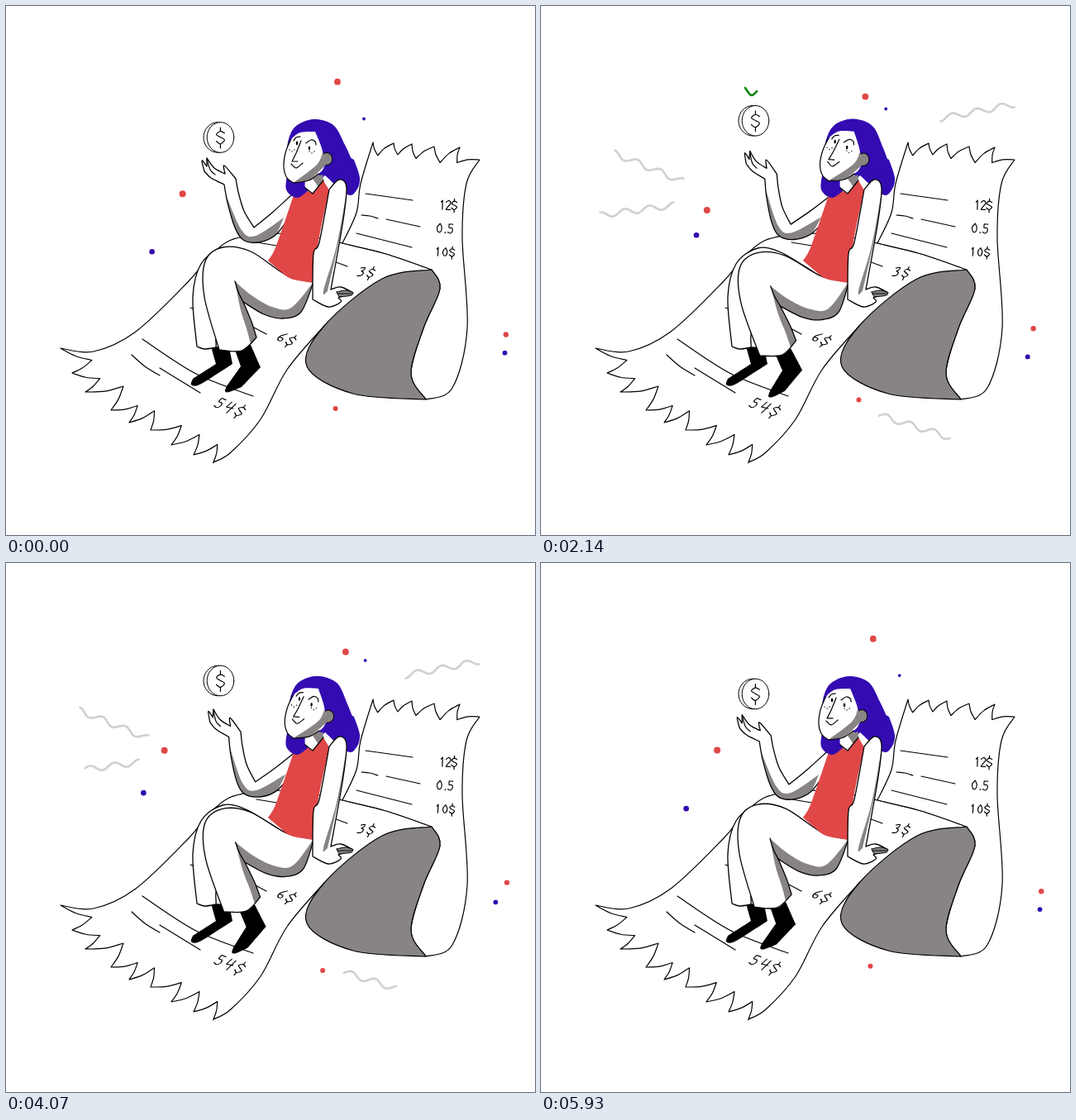
An HTML page with a canvas for the animation above (6000 ms loop, 640x640 px).

```html
<!DOCTYPE html>
<html lang="en">
<head>
<meta charset="utf-8">
<title>Receipt</title>
<style>
html, body { margin: 0; width: 100%; height: 100%; overflow: hidden; background: #fff; }
canvas { display: block; width: 640px; height: 640px; }
</style>
</head>
<body>
<canvas id="stage"></canvas>
<script>
const LOOP = 6000, PEAK = 2860, TRAIL = 700;
const BLACK = '#000', WHITE = '#fff', GREY = '#898484', RED = '#e04747',
      BLUE = '#330bb1', PALE = '#d0d0d0', GREEN = '#078207';
const canvas = document.getElementById('stage');
const ctx = canvas.getContext('2d');
const ratio = window.devicePixelRatio || 1;
canvas.width = canvas.height = 640 * ratio;

// Smooth curve through "x,y x,y"; a slash makes the point before it a corner.
function spline(text) {
  let d = '', last = null;
  for (const piece of text.split('/')) {
    const pts = piece.trim().split(/\s+/).map(s => s.split(',').map(Number));
    if (last) pts.unshift(last); else d = 'M' + pts[0];
    for (let i = 0; i < pts.length - 1; i++) {
      const b = pts[i], c = pts[i + 1], a = pts[i - 1] || b, e = pts[i + 2] || c;
      d += `C${b[0] + (c[0] - a[0]) / 6},${b[1] + (c[1] - a[1]) / 6} ` +
           `${c[0] - (e[0] - b[0]) / 6},${c[1] - (e[1] - b[1]) / 6} ${c}`;
    }
    last = pts[pts.length - 1];
  }
  return d;
}

const cache = new Map();
function curve(text) {
  if (!cache.has(text)) cache.set(text, new Path2D(spline(text)));
  return cache.get(text);
}

function fill(color, text) {
  ctx.fillStyle = color;
  ctx.fill(curve(text));
}

function line(text, width = 1.2) {
  ctx.strokeStyle = BLACK;
  ctx.lineWidth = width;
  ctx.stroke(curve(text));
}

function shape(color, text, width) {
  fill(color, text);
  line(text, width);
}

function oval(color, x, y, rx, ry = rx) {
  ctx.fillStyle = color;
  ctx.beginPath();
  ctx.ellipse(x, y, rx, ry, 0, 0, Math.PI * 2);
  ctx.fill();
}

function turn(x, y, angle, part) {
  ctx.save();
  ctx.translate(x, y);
  ctx.rotate(angle);
  ctx.translate(-x, -y);
  part();
  ctx.restore();
}

// Torn edge: between two tips the paper dips to one side of the line.
function torn(tips, along, depth) {
  const pts = tips.split(' ').map(s => s.split(',').map(Number));
  let text = '' + pts[0];
  for (let i = 1; i < pts.length; i++) {
    const [x, y] = pts[i - 1], [p, q] = pts[i], dx = p - x, dy = q - y;
    const at = (u, v) => [x + u * dx - v * dy, y + u * dy + v * dx];
    text += ` ${at(along / 2 - 0.05, depth / 2)} ${at(along, depth)}` +
            ` / ${at((1 + along) / 2 - 0.05, depth / 2 - 0.05)} ${pts[i]} /`;
  }
  return text;
}

// Wavy line with three crests between two points.
function wave(x, y, p, q, phase) {
  const dx = p - x, dy = q - y, size = 3.6 / Math.hypot(dx, dy) * Math.sign(dx);
  return Array.from({ length: 37 }, (_, i) => {
    const u = i / 36, v = size * Math.cos(Math.PI * 6 * u + phase);
    return [x + u * dx - v * dy, y + u * dy + v * dx].join();
  }).join(' ');
}

const GLYPHS = {
  '0': ['3,0 0,4 1,9 4,9 5,4 3,0'],
  '1': ['0.5,2 / 2,0 / 2,10'],
  '2': ['0,2 3,0 5,3 2,7 0,10 / 5,10'],
  '3': ['0,1 4,0 4,3 2,4 / 5,6 4,9 0,10'],
  '4': ['1,0 / 0,6 / 6,5', '5,0 / 4,11'],
  '5': ['5,0 / 1,0 / 1,4 4,4 5,7 3,10 0,9'],
  '6': ['4,0 0,5 1,9 4,9 4,6 0,6'],
  '.': ['1,9.2 / 1,10'],
  '$': ['6,2 3,0.6 0,3 3,5 6,7 3,10 0,8', '3,-2 / 3,0.6', '3,10 / 3,13']
};

function write(text, x, y, size, angle, slant, step) {
  ctx.save();
  ctx.translate(x, y);
  ctx.rotate(angle);
  ctx.transform(size, 0, -slant * size, size, 0, 0);
  for (const ch of text) {
    GLYPHS[ch].forEach(s => line(s, 1.2 / size));
    ctx.translate(ch === '.' ? 4 : step, 0);
  }
  ctx.restore();
}

const FOLD = '407,287 460,300 515,319';
const SHEET = '66,414 106,418 157,394 220,334 245,304 270,284 300,277 330,275 / 370,279 ' + FOLD +
  ' / 385,387 / 340,440 308,500 272,540 251,552 / ' +
  torn('251,552 227,543 200,531 175,513 149,504 127,489 96,467 80,444 66,414', 0.12, 0.85).slice(0, -1);
const BACK = torn('444,165 469,166 491,167 518,170 549,171 573,186', 0.25, 0.62) +
  ' 557,215 552,280 558,390 540,462 508,476 / 490,445 505,390 525,342 515,319 / 460,300 407,287 / 424,250 429,215 444,165';
const ROLL = '515,319 455,330 385,387 364,436 420,469 508,476 / 490,445 505,390 525,342 515,319';
const RULES = ['435,227 / 492,235', '430,253 440,254 450,257', '460,258 / 501,267', '424,275 / 491,292',
  '394,308 / 413,315', '300,389 / 315,397', '303,286 / 328,290', '223,365 / 226,366',
  '165,403 230,445 299,472', '152,422 168,436 186,447', '186,438 / 235,468'];

function drawPaper() {
  [SHEET, BACK].forEach(s => shape(WHITE, s));
  shape(GREY, ROLL);
  RULES.forEach(s => line(s));
  write('12$', 526, 235, 1.1, 0.03, 0, 6);
  write('0.5', 522, 263, 1.1, 0.06, 0, 8);
  write('10$', 521, 292, 1, 0.06, 0, 8);
  write('3$', 430, 316, 1.1, 0.12, 0.35, 10);
  write('6$', 336, 395, 1.2, 0.4, 0.4, 9);
  write('54$', 260, 474, 1.3, 0.38, 0.35, 10);
}

function drawCoin(y) {
  for (const [x, r] of [[256.5, 17.5], [259.5, 16.3]]) {
    oval(WHITE, x, y, r, 18.3);
    ctx.strokeStyle = BLACK;
    ctx.lineWidth = 1;
    ctx.stroke();
  }
  write('$', 254.5, y - 8.5, 1.65, 0, 0, 0);
}

const ARM = '345,229 322,250 300,268 / 288,248 281,225 278,209 / 264,193 265,203 / 252,196 243,184 / 243,194 ' +
  '/ 237,187 240,200 / 248,208 264,216 / 268,238 277,268 287,283 305,286 325,278 340,260';

function drawArm() {
  fill(WHITE, ARM);
  fill(GREY, '266,228 285,271 302,278 336,256 / 325,278 305,286 287,283 277,268 266,228');
  line('243,185 / 247,198 253,204');
  line(ARM, 1.3);
}

function drawFarLeg() {
  fill(BLACK, '248,412 / 270,413 / 274,433 / 248,450 / 232,459 224,458 226,451 / 254,433 / 248,412');
  shape(WHITE, '330,322 290,298 262,293 236,312 226,352 231,412 / 240,415 254,413 / 262,380 330,322', 1.3);
}

const LEG = '372,334 340,326 296,297 262,292 241,309 240,352 258,416 / 285,417 303,401 ' +
  '/ 297,382 287,358 / 312,373 335,378 357,370 372,334';

function drawNearLeg() {
  fill(BLACK, '277,416 / 296,410 / 308,437 / 285,461 / 270,467 265,466 267,460 / 284,436 / 277,416');
  fill(GREY, LEG);
  fill(WHITE, '372,334 340,326 296,297 262,292 241,309 240,352 258,416 / 285,417 296,409 ' +
    '/ 291,390 284,368 277,333 / 297,350 322,364 345,365 372,334');
  line(LEG, 1.3);
  line('277,333 281,346 287,358', 1.3);
}

function drawBody() {
  fill(RED, '348,229 / 362,222 / 371,227 / 384,211 / 391,223 / 378,285 372,335 / 345,330 331,320 317,308 / 327,290 348,229');
  fill(BLUE, '341,200 339,222 352,232 366,223 / 386,205 / 413,228 424,223 428,208 421,186 / 385,165 / 341,200');
  fill(WHITE, '363,205 / 362,219 371,227 / 384,211 / 380,198');
  fill(GREY, '371,209 / 383,198 / 384,211 / 378,219 / 371,209');
  line('362,220 371,227 / 384,211');
}

function drawHead() {
  fill(BLUE, '340,188 341,165 350,146 372,137 396,144 410,168 421,192 / 380,205');
  oval(GREY, 388, 185, 6.8, 7.6);
  ctx.strokeStyle = BLACK;
  ctx.lineWidth = 1;
  ctx.stroke();
  fill(WHITE, '346,160 338,178 336,195 340,208 348,214 / 378,203 386,192 / 382,172 374,152 / 356,153 346,160');
  fill(GREY, '383,177 376,192 349,213 / 366,211 387,192 / 383,177');
  line('344,162 338,178 336,195 340,208 348,214 / 366,211 378,203');
  line('357,163 351,178 346,188 / 353,188');
  line('345,191 351,196 359,190');
  line('348,163 351,159 356,158');
  line('363,166 369,162 374,164 375,168');
  for (const [x, y] of [[352, 166], [367, 172]]) {
    oval(BLACK, x, y, 1.2, 2.4);
    for (const k of [-1, 0, 1])
      oval(BLACK, x - 6 + 3 * k + (x > 360) * 9, y + 10 - 2 * k * k - (x > 360) * 4, 0.7);
  }
}

function drawSupport() {
  fill(WHITE, '391,222 403,210 412,220 407,265 393,343 / 405,340 420,347 / 402,353 / 405,358 390,364 371,355 / 372,300 379,286 391,222');
  fill(GREY, '412,225 407,265 389,345 / 384,345 400,290 412,225');
  line('391,222 403,210 412,220 407,265 393,343 / 405,340 420,347 / 402,353 / 405,358 390,364 371,355 / 372,300 379,286 391,222', 1.3);
  shape(GREY, '400,346 410,344 419,346 / 418,350 403,352 / 400,346', 1);
  line('401,348 / 418,348', 1);
}

// Strokes that draw themselves on and later run back.
const TRAILS = [
  [wave(483, 136, 572, 119, 0), 930, 4565],
  [wave(171, 212, 88, 178, Math.PI), 930, 4565],
  [wave(161, 241, 72, 253, Math.PI), 210, 3880],
  [wave(409, 495, 495, 522, 1.35), 210, 3880],
  ['247,99 255,108 265,99 275,92', 1770, 3200, GREEN]
].map(([text, on, off, color = PALE]) => {
  const el = document.createElementNS('http://www.w3.org/2000/svg', 'path');
  el.setAttribute('d', spline(text));
  return { text, on, off, color, len: el.getTotalLength() };
});

const rise = (t, start) => Math.min(1, Math.max(0, (t - start) / TRAIL));

function drawTrails(t) {
  for (const { text, on, off, color, len } of TRAILS) {
    const part = rise(t, on) - rise(t, off);
    if (part <= 0) continue;
    ctx.strokeStyle = color;
    ctx.lineWidth = 2.6;
    ctx.setLineDash([len * part, 999]);
    ctx.stroke(curve(text));
  }
  ctx.setLineDash([]);
}

// Each dot circles its centre once per loop: x, y, orbit, start in degrees, direction.
const DOTS = [
  { orbit: [401, 102.7, 11, -90, -1], r: 3.9, color: RED },
  { orbit: [428, 126.7, 11, 63, 1], r: 1.9, color: BLUE },
  { orbit: [202.5, 234, 13, -31, 1], r: 4, color: RED },
  { orbit: [177.5, 284.5, 12.8, 94, -1], r: 3.3, color: BLUE },
  { orbit: [602, 391.7, 6.5, 64, 1], r: 3.2, color: RED },
  { orbit: [595, 418.5, 8.6, 8, 1], r: 2.9, color: BLUE },
  { orbit: [389, 485.2, 9.8, 11, -1], r: 3, color: RED }
];

function drawDots(t) {
  for (const { orbit: [x, y, size, start, way], r, color } of DOTS) {
    const a = start * Math.PI / 180 + way * Math.PI * 2 * t / LOOP;
    oval(color, x + size * Math.cos(a), y + size * Math.sin(a), r);
  }
}

function draw(now) {
  const t = now % LOOP;
  const lift = t < PEAK ? t / PEAK : (LOOP - t) / (LOOP - PEAK);
  ctx.setTransform(ratio, 0, 0, ratio, 0, 0);
  ctx.fillStyle = WHITE;
  ctx.fillRect(0, 0, 640, 640);
  ctx.lineCap = ctx.lineJoin = 'round';
  drawPaper();
  turn(345, 290, 0.118 * lift, drawArm);
  drawFarLeg();
  turn(360, 325, -0.095 * lift, drawNearLeg);
  drawBody();
  turn(380, 214, 0.1 * lift, drawHead);
  drawSupport();
  drawCoin(159 - 27 * lift);
  drawTrails(t);
  drawDots(t);
}

const begin = performance.now();
function tick() {
  draw(performance.now() - begin);
  requestAnimationFrame(tick);
}
tick();
</script>
</body>
</html>
```
